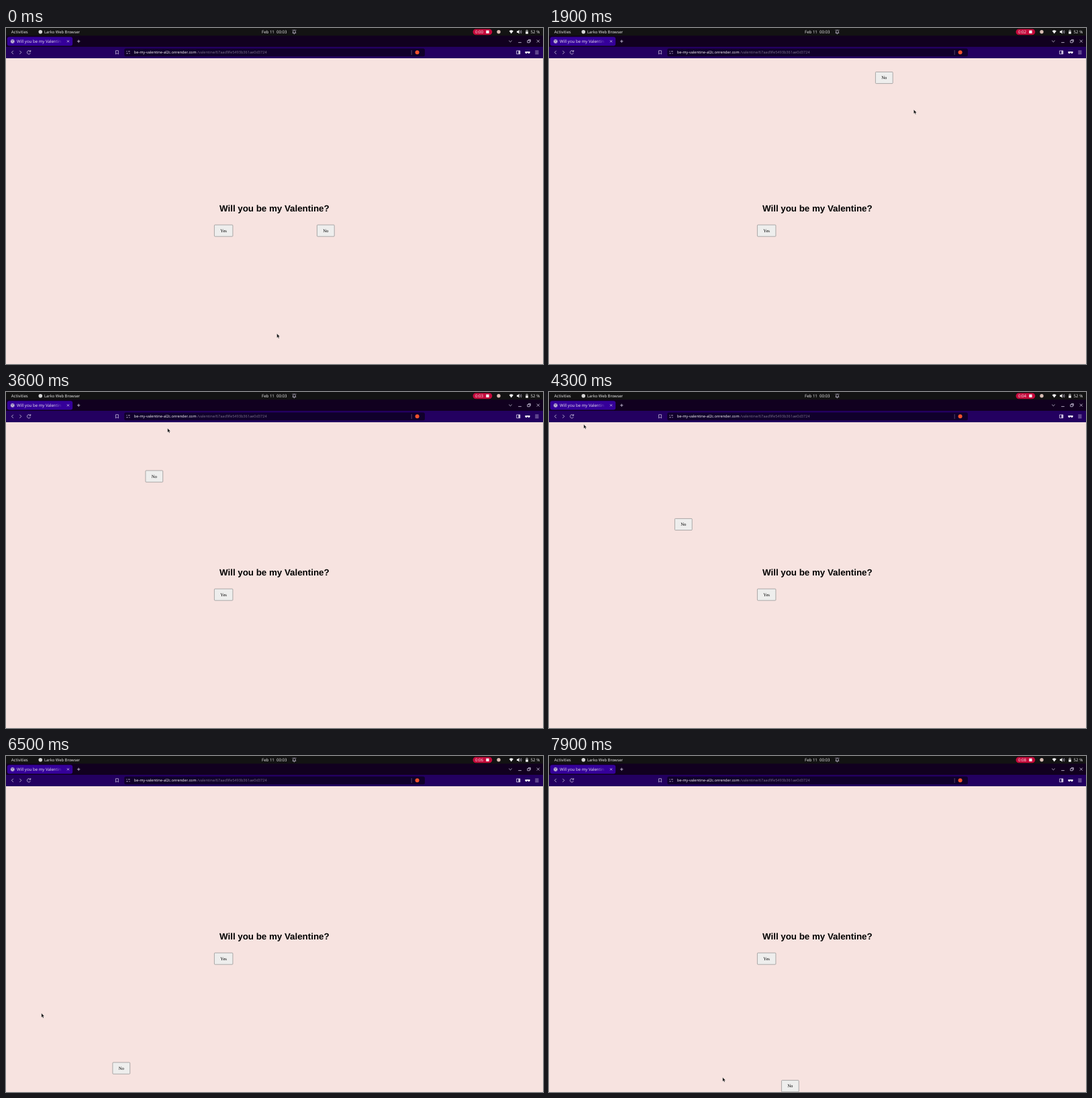
Recreate the animation shown at these times as an HTML page. Size 800 by 500 pixels, loop 8 s.

```html
<!DOCTYPE html>
<html lang="en">
<head>
<meta charset="utf-8">
<title>Will you be my Valentine?</title>
<style>
  html, body { margin: 0; height: 100%; overflow: hidden; background: #f7e3e0; }
  svg { display: block; width: 100%; height: 100%; text-rendering: geometricPrecision; }
  .ui { font: 6.1px "Open Sans", "Noto Sans", sans-serif; fill: #f2f2f2; }
  .line { fill: none; stroke: #d8d0e8; stroke-width: .8; }
  .button rect { fill: #eeeeed; stroke: #8c8c8c; stroke-width: .7; }
  .button text { font: 6.67px "Liberation Serif", Times, serif; text-anchor: middle; }
  .title { font: bold 13.33px "Liberation Sans", Arial, sans-serif; text-anchor: middle; }
</style>
</head>
<body>
<svg viewBox="0 0 800 500">
  <defs>
    <linearGradient id="fade" gradientUnits="userSpaceOnUse" x1="70" x2="84">
      <stop stop-color="#eee"/><stop offset="1" stop-color="#eee" stop-opacity=".1"/>
    </linearGradient>
  </defs>

  <!-- page -->
  <rect width="800" height="500" fill="#f7e3e0"/>
  <text class="title" x="399.8" y="272.8">Will you be my Valentine?</text>
  <g class="button" transform="translate(310 292.6)">
    <rect x=".4" y=".4" width="27.5" height="17.2" rx="1"/>
    <text x="14.1" y="11.2">Yes</text>
  </g>
  <g class="button" id="no">
    <rect x=".4" y=".4" width="25.8" height="17.2" rx="1"/>
    <text x="13.3" y="11.2">No</text>
  </g>

  <!-- system bar -->
  <rect width="800" height="12" fill="#131313"/>
  <g class="ui">
    <text x="7.7" y="8">Activities</text>
    <circle cx="51.3" cy="5.8" r="2.8" fill="#d5d5d5"/>
    <text x="57" y="8" style="font-size:5.9px">Larko Web Browser</text>
    <text x="381" y="8" xml:space="preserve">Feb 11  00:03</text>
    <rect x="695.5" y="1.4" width="28.8" height="8.8" rx="4.4" fill="#c5093b"/>
    <text x="699" y="8" id="timer">0:00</text>
    <rect x="715.2" y="3.6" width="4.4" height="4.4"/>
    <circle cx="734" cy="5.8" r="2.7" fill="#d9bdb4"/>
    <text x="781.6" y="8">52 %</text>
    <path d="M749.6 4.4Q752.7 1.9 755.8 4.4L752.7 8.4Z"/>
    <path d="M761 4.6h1.6l2-1.8v6l-2-1.8h-1.6Z"/>
    <path d="M774.2 3.2h1v-.8h1.6v.8h1v5.4h-3.6Z" opacity=".5"/>
    <path d="M774.2 5.6h3.6v3h-3.6Z"/>
  </g>
  <g class="line">
    <path d="M427 7.4q.8-.8.8-3q0-1.4 1.6-1.4t1.6 1.4q0 2.2.8 3ZM428.7 8.8h1.4M427 2.6l-.5.8M431.8 2.6l.5.8"/>
    <path d="M766 4q1.2 1.8 0 3.6M767.3 3.2q1.6 2.6 0 5.2" stroke-width=".6"/>
  </g>

  <!-- tab strip -->
  <rect y="11.4" width="800" height="17" fill="#11001f"/>
  <rect x="1.8" y="13.2" width="97.4" height="13.2" rx="3" fill="#35009a"/>
  <circle cx="9.8" cy="19.8" r="2.9" fill="#cfc9dc"/>
  <path d="M7.6 18.4l2.4.5-.6 1.4-1.2.8M10.6 17.4l.4 1.2 1.4.5M10.5 22l1.3-1.4" fill="none" stroke="#5a3c98" stroke-width=".8"/>
  <text class="ui" x="16" y="22" style="fill:url(#fade)">Will you be my Valentin</text>
  <g class="line">
    <path d="M91 18.3l3 3m0-3l-3 3M106 19.8h4.4M108.2 17.6v4.4"/>
    <path d="M749.2 18.7l2.2 2.1 2.2-2.1M763.2 21.6h4.6M790.8 17.6l4 4m0-4l-4 4"/>
    <path d="M776.8 18.6h3.4v3.2h-3.4ZM778 17.4h3.4v3.2"/>
  </g>

  <!-- toolbar -->
  <rect y="28" width="800" height="17" fill="#230060"/>
  <rect x="176.2" y="30.5" width="447.8" height="11.7" rx="2.5" fill="#10002b"/>
  <g class="line">
    <path d="M10.8 33.8l-2.4 2.5 2.4 2.5M20.4 33.8l2.4 2.5-2.4 2.5"/>
    <path d="M36.2 34.8a2.6 2.6 0 1 0 .2 2.6M36.7 33v2.2h-2.2"/>
    <path d="M163.5 33.7h3.9v5.2l-1.95-1.3-1.95 1.3Z" stroke-width=".7"/>
    <path d="M179.4 34.8h1.2M182.2 34.8h2.4M179.4 37.8h2.2M183.4 37.8h1.2" stroke-width=".9"/>
    <path d="M604.2 33v7" stroke="#7d7391" stroke-width=".6"/>
    <path d="M760.6 33.9h5.2v4.8h-5.2Z"/>
    <path d="M788.3 34.2h5.2M788.3 36.3h5.2M788.3 38.4h5.2" stroke-width=".7"/>
  </g>
  <rect x="763.4" y="33.9" width="2.4" height="4.8" fill="#d8d0e8"/>
  <path d="M773.4 35h7.2v1.4q-.3 1.6-1.7 1.6t-1.6-1.5h-.6q-.2 1.5-1.6 1.5t-1.7-1.6Z" fill="#fff"/>
  <circle cx="612.6" cy="36.3" r="3" fill="#f2512c"/>
  <g class="ui" style="font-size:5.6px">
    <text x="190.8" y="38.2" style="fill:#fff">be-my-valentine-al2c.onrender.com</text>
    <text x="284.9" y="38.2" style="fill:#7c728d">/valentine/67aad9fe5493b361ae0d3724</text>
  </g>

  <path id="cursor" d="M0 0V6.1L1.4 4.9L2.4 7.1L3.4 6.6L2.5 4.5H4.3Z" fill="#111" stroke="#fff" stroke-opacity=".75" stroke-width=".4"/>
</svg>
<script>
const LOOP = 8000, STEP = 100;
const PAGE_TOP = 45, LOWEST = 482.2;

// a chase in a few stops: time, pointer, fleeing button
const stops = [
  { at: 500, pointer: [403.6, 454.8], button: [463, 292.6] },
  { at: 600, pointer: [440, 362], button: [463, 292.6] },
  { at: 1900, pointer: [543.4, 121.4], button: [486, 65] },
  { at: 2900, pointer: [429.6, 59.6], button: [228, 45] },
  { at: 4300, pointer: [51.8, 48.2], button: [187, 188] },
  { at: 5600, pointer: [220.7, 226.6], button: [111, 323.3] },
  { at: 6500, pointer: [52.8, 382.8], button: [158.5, 455.6] },
  { at: 7900, pointer: [258.7, 478.2], button: [346, 482.2] }
];

const [no, cursor, timer] = ["no", "cursor", "timer"].map(id => document.getElementById(id));
const clamp = (value, low, high) => Math.min(Math.max(value, low), high);
const place = (el, [x, y]) => el.setAttribute("transform", `translate(${x} ${y})`);
const mix = (a, b, part) => a.map((value, i) => value + (b[i] - value) * part);

function draw(now) {
  const time = Math.floor(now % LOOP / STEP) * STEP;
  const last = stops.length - 1;
  const next = clamp(stops.findIndex(stop => stop.at > time), 1, last);
  const to = stops[time >= stops[last].at ? last : next];
  const from = stops[stops.indexOf(to) - 1];
  const part = clamp((time - from.at) / (to.at - from.at), 0, 1);

  const [x, y] = mix(from.button, to.button, part);
  place(cursor, mix(from.pointer, to.pointer, part));
  place(no, [x, clamp(y, PAGE_TOP, LOWEST)]);
  timer.textContent = "0:0" + Math.floor((time + STEP) / 1000);
}

const start = performance.now();
function tick() {
  draw(performance.now() - start);
  requestAnimationFrame(tick);
}
tick();
</script>
</body>
</html>
```
